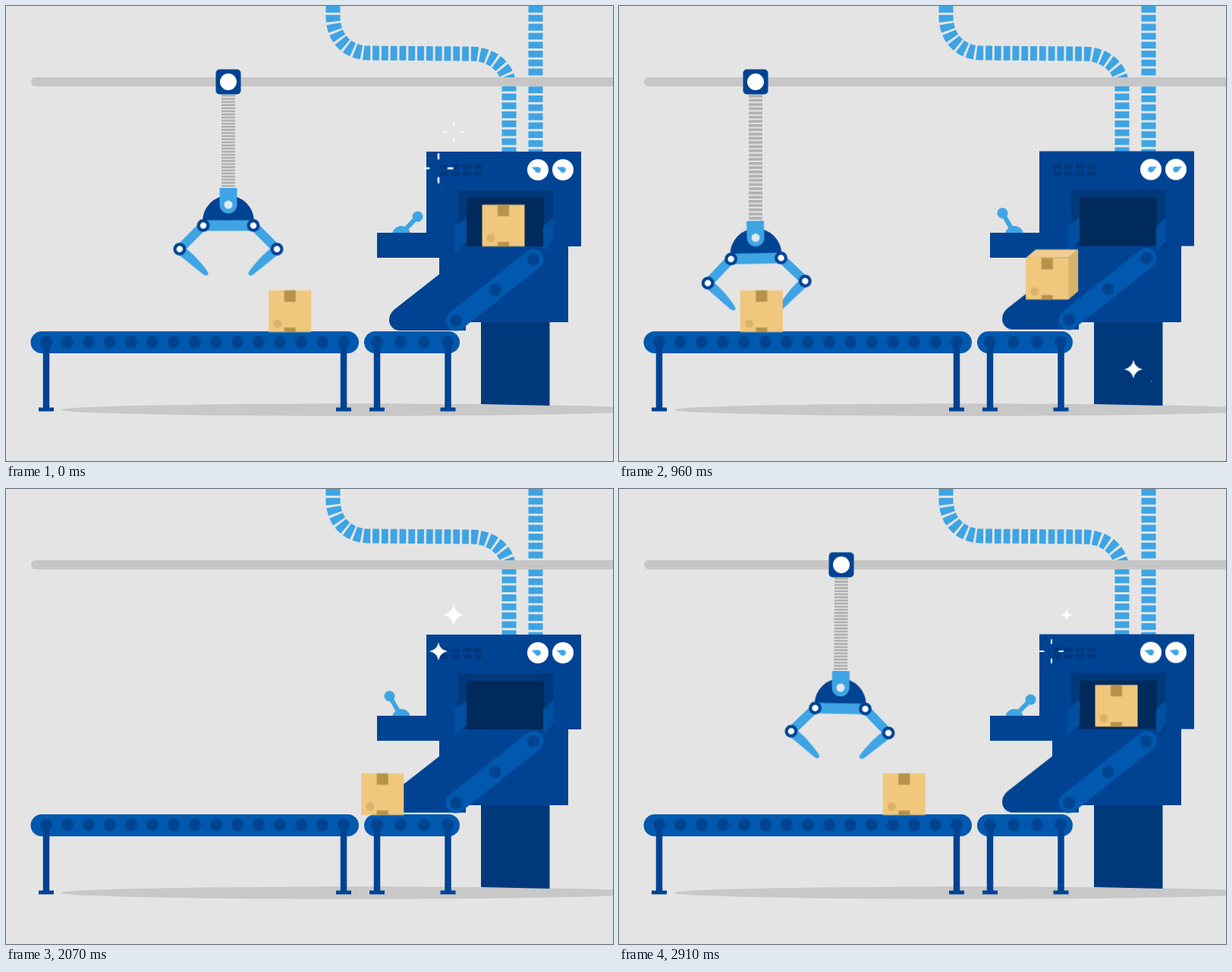
An HTML page that plays this animation: 800 by 600 pixels, repeating every 2.94 s.

```html
<!DOCTYPE html>
<html lang="en">
<head>
<meta charset="utf-8">
<title>Packing line</title>
<style>
html, body { margin: 0; width: 100%; height: 100%; overflow: hidden; background: #e4e4e4; }
svg { display: block; width: 100vw; height: 100vh; }

.main { fill: #004393; }
.mid { fill: #0059ae; }
.light { fill: #3ea4e4; }
.deep { fill: #00397b; }
.white { fill: #fff; }
.stroke { fill: none; stroke: #3ea4e4; stroke-linecap: round; }
.tube { fill: none; stroke: #3ea4e4; stroke-width: 19; stroke-dasharray: 8.8 3; }
.dots { stroke: #00448f; stroke-width: 16; stroke-linecap: round; }
.ring { fill: #fff; stroke: #004393; stroke-width: 4.2; }

.anim { animation: 2940ms ease-in-out infinite; }

/* crane */
.trolley { animation-name: trolley; }
@keyframes trolley {
  0%, 15.3% { transform: translateX(293px); animation-timing-function: ease-in-out; }
  31.5%, 44.56% { transform: translateX(180px); animation-timing-function: cubic-bezier(.333, 0, .667, .333); }
  66.67%, 70.75% { transform: translateX(940px); animation-timing-function: cubic-bezier(.35, .3, .7, .7); }
  80.61% { transform: translateX(393px); animation-timing-function: cubic-bezier(.15, .75, .4, 1); }
  100% { transform: translateX(293px); }
}
.swing { animation-name: swing; }
@keyframes swing {
  0%, 15.3%, 32.65%, 44.56% { transform: rotate(0deg); }
  23% { transform: rotate(-1deg); }
  48.98% { transform: rotate(.7deg); animation-timing-function: linear; }
  59.18% { transform: rotate(5deg); }
  66.67% { transform: rotate(6deg); }
  73.5% { transform: rotate(-8deg); }
  80.61% { transform: rotate(-6.4deg); }
  93% { transform: rotate(1.2deg); }
  98.98% { transform: rotate(.35deg); }
  100% { transform: rotate(.1deg); }
}
.tilt { animation-name: tilt; }
@keyframes tilt {
  0%, 34.35%, 44.56% { transform: rotate(0deg); }
  14.29% { transform: rotate(-.7deg); }
  24% { transform: rotate(-2.5deg); }
  32.65% { transform: rotate(-1.2deg); }
  48.98% { transform: rotate(3.3deg); animation-timing-function: linear; }
  59.18% { transform: rotate(4.6deg); }
  66.67% { transform: rotate(5deg); }
  73.5% { transform: rotate(-7deg); }
  80.61% { transform: rotate(-5.8deg); }
  94% { transform: rotate(2deg); }
  98.98% { transform: rotate(.7deg); }
  100% { transform: rotate(.1deg); }
}
.reach { animation-name: reach; }
@keyframes reach {
  0%, 15.3%, 46.94%, 100% { transform: translateY(0); }
  29.9%, 37.07% { transform: translateY(43.5px); }
}
.spring { animation-name: spring; stroke: #afafaf; stroke-width: 18; stroke-dasharray: 2.6 1.5; }
@keyframes spring {
  0%, 15.3%, 46.94%, 100% { transform: scaleY(1); }
  29.9%, 37.07% { transform: scaleY(1.354); }
}
.arm { animation-name: arm; }
@keyframes arm {
  0%, 4%, 33%, 100% { transform: rotate(45deg); }
  13.5%, 22% { transform: rotate(75.5deg); }
}
.finger { animation-name: finger; }
@keyframes finger {
  0%, 4%, 35%, 100% { transform: rotate(-93deg); }
  13.5%, 22% { transform: rotate(-42deg); }
}
.held { animation-name: held; }
@keyframes held {
  0%, 34.35% { opacity: 0; }
  34.36%, 68% { opacity: 1; }
  68.01%, 100% { opacity: 0; }
}

/* boxes */
.belt-box { animation-name: belt-box; animation-timing-function: linear; }
@keyframes belt-box {
  0% { transform: translateX(374.4px); opacity: 1; }
  14.29% { transform: translateX(297px); }
  32.65% { transform: translateX(188px); }
  34.35% { transform: translateX(180px); opacity: 1; }
  34.36% { transform: translateX(180px); opacity: 0; }
  53.05% { transform: translateX(541px); opacity: 0; }
  53.06% { transform: translateX(541px); opacity: 1; }
  59.18% { transform: translateX(533px); }
  80.61% { transform: translateX(463px); }
  98.98% { transform: translateX(375.8px); }
  100% { transform: translateX(374.4px); opacity: 1; }
}
.chute-box { animation-name: chute-box; }
@keyframes chute-box {
  0% { transform: translate(655.5px, 289.5px) rotate(0deg); opacity: 1; animation-timing-function: cubic-bezier(.4, 0, .75, .6); }
  14.29% { transform: translate(628.3px, 310.5px) rotate(0deg); animation-timing-function: linear; }
  32.65% { transform: translate(564.3px, 359.5px) rotate(0deg); animation-timing-function: ease-out; }
  45% { transform: translate(545px, 375px) rotate(0deg); animation-timing-function: ease-in; }
  48.98% { transform: translate(541.5px, 380.5px) rotate(-7deg); }
  53.05% { transform: translate(541px, 402.5px) rotate(0deg); opacity: 1; }
  53.06% { transform: translate(541px, 402.5px) rotate(0deg); opacity: 0; }
  89.79% { transform: translate(655.5px, 219px) rotate(0deg); opacity: 0; }
  89.8% { transform: translate(655.5px, 219px) rotate(0deg); opacity: 1; animation-timing-function: cubic-bezier(.3, .3, .7, .88); }
  100% { transform: translate(655.5px, 289.5px) rotate(0deg); opacity: 1; }
}
.top { animation-name: top; fill: #f1cb8f; }
@keyframes top {
  0%, 53.05%, 100% { d: path("M-28-27.5H28L28-27.5H-28Z"); }
  11%, 48.98% { d: path("M-28-27.5H28L41-38.5H-15Z"); }
}
.side { animation-name: side; fill: #d9b36b; }
@keyframes side {
  0%, 53.05%, 100% { d: path("M28-27.5V27.5L28 27.5V-27.5Z"); }
  11%, 48.98% { d: path("M28-27.5V27.5L41 16.5V-38.5Z"); }
}

/* machine */
.upper { animation-name: upper; }
@keyframes upper {
  0%, 9%, 24%, 38%, 54%, 70%, 90%, 100% { transform: translateY(0); }
  4%, 19%, 28%, 44%, 48.98%, 64%, 75%, 85%, 95% { transform: translateY(-2px); }
  14.29%, 32.65%, 80.61%, 98.98% { transform: translateY(-.5px); }
  59.18% { transform: translateY(-1.2px); }
}
.lower { animation-name: lower; }
@keyframes lower {
  0%, 8%, 32.65%, 41%, 70%, 90%, 98.98%, 100% { transform: translateY(2px); }
  4%, 14.29%, 24%, 37%, 48.98%, 59.18%, 65%, 80.61%, 95% { transform: translateY(0); }
}
.chute { animation-name: chute; }
@keyframes chute {
  0%, 14.29%, 26%, 37%, 48.98%, 59.18%, 80.61%, 93%, 100% { transform: translateY(0); }
  5%, 20%, 32.65%, 42%, 54%, 68%, 87%, 98.98% { transform: translateY(-1.4px); }
}
.lever { animation-name: lever; }
@keyframes lever {
  0%, 9.5%, 95%, 100% { transform: rotate(44deg); }
  15.6%, 89% { transform: rotate(-30deg); }
}
.needle { animation-name: needle; }
@keyframes needle {
  0%, 100% { transform: rotate(-67deg); }
  14.29% { transform: rotate(42deg); }
  32.65% { transform: rotate(64deg); }
  48.98% { transform: rotate(74deg); }
  59.18% { transform: rotate(-78deg); }
  80.61% { transform: rotate(-62deg); }
  98.98% { transform: rotate(-73deg); }
}

/* sparkles: --t start within the cycle in ms, --r size */
.star, .blip, .burst { animation: 735ms ease-out calc((var(--t) - 735) * 1ms) infinite; }
.star { animation-name: star; }
@keyframes star {
  0%, 34%, 100% { transform: scale(0); }
  20% { transform: scale(var(--r)); animation-timing-function: ease-in; }
}
.blip { animation-name: blip; }
@keyframes blip {
  0%, 15%, 100% { transform: scale(0); }
  8% { transform: scale(var(--r)); }
}
.burst { animation-name: burst; stroke: #fff; stroke-width: 4; stroke-linecap: round; }
@keyframes burst {
  0% { transform: scale(calc(var(--r) * .3)); opacity: 1; }
  11% { opacity: 1; }
  15%, 100% { transform: scale(var(--r)); opacity: 0; }
}
</style>
</head>
<body>
<svg viewBox="0 0 800 600" preserveAspectRatio="none">
  <defs>
    <g id="box">
      <path fill="#f0c77c" d="M-28-27.5H28V27.5H-28Z"/>
      <path fill="#b6924a" d="M-7.5-27.5h15v15h-15ZM-7.5 21.5h15v6h-15Z"/>
      <circle cx="-16.5" cy="16.5" r="5.5" fill="#d9b369"/>
    </g>
    <path id="star" class="white" d="M0-10Q1.6-1.6 10 0Q1.6 1.6 0 10Q-1.6 1.6-10 0Q-1.6-1.6 0-10Z"/>
    <path id="burst" d="M0-21V-31M0 21V31M-21 0H-31M21 0H31"/>
    <path id="finger" class="light" d="M-6.5 0L-4 46Q-3 51 1 50Q4 48 6.5 20V0Z"/>
    <clipPath id="mouth"><path d="M400 253H800V600H400Z"/></clipPath>
  </defs>

  <rect width="800" height="600" fill="#e4e4e4"/>
  <ellipse cx="460" cy="532.5" rx="388" ry="8.2" fill="#c8c8c8"/>

  <path class="tube" d="M431 0V14C431 42 450 62 478 62L612 63C642 63 663 82 663 108V194"/>
  <path class="tube" d="M698 0V194"/>
  <path d="M39 100H810" stroke="#c6c6c6" stroke-width="12" stroke-linecap="round"/>

  <!-- machine -->
  <path class="deep" d="M626 410H716.5V527L626 525Z"/>
  <g class="anim lower"><path class="main" d="M571 250H741V415H571Z"/></g>
  <g class="anim chute">
    <path class="main" d="M572 353L512 400Q505 406 505 414A14 14 0 0 0 519 428H606V353Z"/>
  </g>
  <g transform="translate(521 300)">
    <g class="anim lever">
      <path class="stroke" d="M0 0V-30" stroke-width="6"/>
      <circle class="light" cy="-31" r="7"/>
    </g>
    <circle class="light" cy="2" r="12"/>
  </g>
  <path class="main" d="M489 299H580V332H489Z"/>
  <g class="anim upper">
    <path class="main" d="M554 192H758V317H554Z"/>
    <path d="M572 212H629M572 221H629" stroke="#00387e" stroke-width="6" stroke-dasharray="11 4"/>
    <path class="deep" d="M596 243H721V317H596Z"/>
    <path fill="#002a5b" d="M607 253H709V317H607Z"/>
    <path fill="#004fa1" d="M591 291L607 279V311L591 326ZM708 291L721 279V311L708 324Z"/>
    <g transform="translate(701 216)">
      <circle class="white" r="14"/>
      <g class="anim needle light"><circle r="3.8"/><path d="M-3.5-1L0-9L3.5-1Z"/></g>
    </g>
    <g transform="translate(734 216)">
      <circle class="white" r="14"/>
      <g class="anim needle light"><circle r="3.8"/><path d="M-3.5-1L0-9L3.5-1Z"/></g>
    </g>
  </g>
  <g class="anim chute">
    <path d="M695 334L593 415" stroke="#0059ae" stroke-width="27" stroke-linecap="round"/>
    <path class="dots" d="M695 334h0M644.5 374.5h0M593 415h0"/>
  </g>

  <!-- conveyors -->
  <rect class="mid" x="32.5" y="429" width="432.5" height="29" rx="14.5"/>
  <rect class="mid" x="472" y="429" width="126" height="29" rx="14.5"/>
  <path class="dots" stroke-dasharray="0 28" d="M53 443H446"/>
  <path class="dots" stroke-dasharray="0 31" d="M489 443H583"/>
  <path d="M53 443V531M445 443V531M489 443V531M582.5 443V531" stroke="#004393" stroke-width="8.5"/>
  <path d="M43 532H63M435 532H455M479 532H499M572.5 532H592.5" stroke="#004393" stroke-width="5"/>

  <g clip-path="url(#mouth)">
    <g class="anim chute-box">
      <path class="anim top" d="M-28-27.5H28L28-27.5H-28Z"/>
      <path class="anim side" d="M28-27.5V27.5L28 27.5V-27.5Z"/>
      <use href="#box"/>
    </g>
  </g>

  <!-- crane -->
  <g transform="translate(0 100)">
    <g class="anim trolley">
      <g class="anim swing">
        <g transform="translate(0 17)"><path class="anim spring" d="M0 0V124"/></g>
        <rect class="main" x="-16.5" y="-16.5" width="33" height="33" rx="5"/>
        <circle class="white" r="11"/>
        <g class="anim reach">
          <g transform="translate(0 162)">
            <g class="anim tilt">
              <path class="main" d="M-34 22A34 34 0 0 1 34 22Z"/>
              <path class="stroke" d="M-33 27.5H33" stroke-width="14"/>
              <g transform="translate(-33 27.5)">
                <g class="anim arm">
                  <g transform="translate(0 44)"><g class="anim finger"><use href="#finger"/></g></g>
                  <path class="stroke" d="M0 0V44" stroke-width="12"/>
                  <circle class="ring" r="6.3"/>
                  <circle class="ring" cy="44" r="6.3"/>
                </g>
              </g>
              <g transform="translate(33 27.5) scale(-1 1)">
                <g class="anim arm">
                  <g transform="translate(0 44)"><g class="anim finger"><use href="#finger"/></g></g>
                  <path class="stroke" d="M0 0V44" stroke-width="12"/>
                  <circle class="ring" r="6.3"/>
                  <circle class="ring" cy="44" r="6.3"/>
                </g>
              </g>
              <path class="light" d="M-11.5-22H11.5V0A11.5 11.5 0 0 1-11.5 0Z"/>
              <circle r="5.5" fill="#dfe9f2"/>
              <g transform="translate(0 97)"><g class="anim held"><use href="#box"/></g></g>
            </g>
          </g>
        </g>
      </g>
    </g>
  </g>

  <g transform="translate(0 402.5)"><g class="anim belt-box"><use href="#box"/></g></g>

  <!-- sparkles -->
  <g transform="translate(590 166)">
    <use href="#star" class="star" style="--t:490;--r:1.5"/>
    <use href="#burst" class="burst" style="--t:705;--r:.72"/>
  </g>
  <g transform="translate(570 214)">
    <use href="#star" class="blip" style="--t:545;--r:1.2"/>
    <use href="#burst" class="burst" style="--t:655;--r:.65"/>
  </g>
  <g transform="translate(553 183)"><use href="#star" class="star" style="--t:267;--r:2.9"/></g>
  <g transform="translate(626 72)"><use href="#star" class="star" style="--t:285;--r:2.2"/></g>
  <g transform="translate(651 84)"><use href="#star" class="star" style="--t:345;--r:.6"/></g>
  <g transform="translate(86 448)"><use href="#star" class="star" style="--t:290;--r:1.65"/></g>
  <g transform="translate(55 429)">
    <use href="#star" class="blip" style="--t:266;--r:1.6"/>
    <use href="#burst" class="burst" style="--t:355;--r:1.25"/>
  </g>
  <g transform="translate(678 479)"><use href="#star" class="star" style="--t:162;--r:2"/></g>
  <g transform="translate(702 495)">
    <use href="#star" class="blip" style="--t:222;--r:.75"/>
    <use href="#burst" class="burst" style="--t:340;--r:1.08"/>
  </g>
</svg>
</body>
</html>
```
